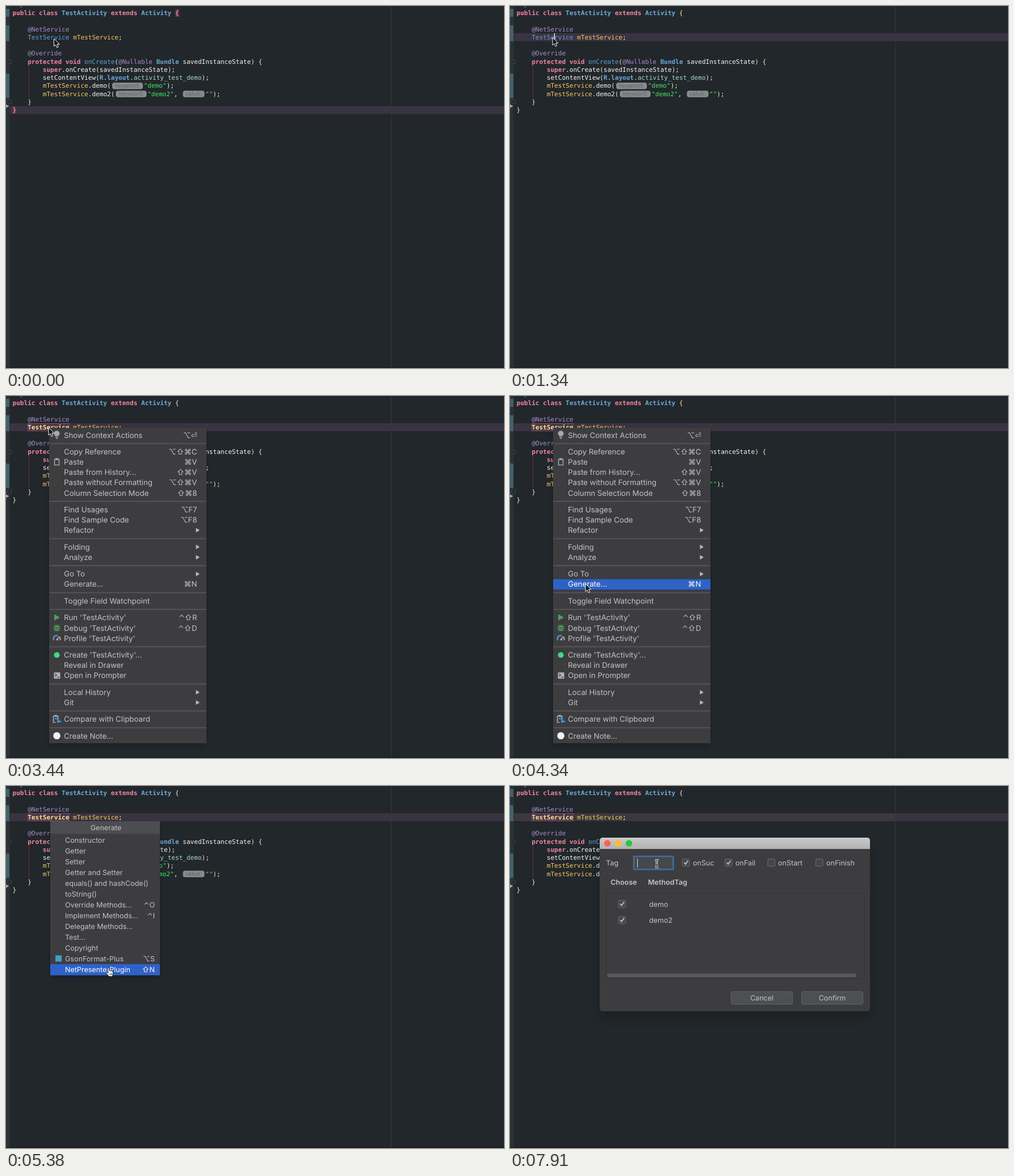
Animation, 877 px wide and 638 px high, one loop 8 s. Source, as an HTML page:

```html
<!DOCTYPE html>
<html lang="en">
<head>
<meta charset="utf-8">
<title>Code editor</title>
<style>
html, body { margin: 0; width: 100%; height: 100%; overflow: hidden; background: #21272b; }
svg { display: block; width: 877px; height: 638px; }
text { white-space: pre; text-rendering: geometricPrecision; }
.code { font: 11.07px "DejaVu Sans Mono", monospace; fill: #f4f5f0; }
.ui { font: 12.55px Inter, sans-serif; fill: #c3c4c6; }
#menu .ui { font-size: 13.25px; }
.hint { font: 10.5px "Open Sans", sans-serif; fill: #5d6062; }
.k { fill: #f283a4; font-weight: bold; }
.c { fill: #6fa9d6; font-weight: bold; }
.f { fill: #649fcd; }
.a { fill: #a88bcd; }
.y { fill: #fbc65c; }
.s { fill: #42e45f; }
.r { fill: #a9d6cb; }
.b { fill: #f2ebc6; }
.g { fill: #8b9296; }
.m { fill: #ffe09a; font-weight: bold; }
.on { fill: #fff; }
.bold { font-weight: 600; }
.mid { text-anchor: middle; }
.end { text-anchor: end; }
.sym { font-family: "DejaVu Sans", sans-serif; }
</style>
</head>
<body>
<svg id="stage" viewBox="0 0 877 638"></svg>
<script>
const LOOP = 8000;
const CH = 6.664, LINE = 14.26, LEFT = 11.5;
const stage = document.getElementById('stage');

const rect = (x, y, w, h, fill, more = '') =>
  `<rect x="${x}" y="${y}" width="${w}" height="${h}" fill="${fill}" ${more}/>`;
const path = (d, fill, more = '') => `<path d="${d}" fill="${fill}" ${more}/>`;
const dot = (x, y, r, fill) => `<circle cx="${x}" cy="${y}" r="${r}" fill="${fill}"/>`;
const group = (id, body, more = '') => `<g id="${id}" ${more}>${body}</g>`;
const label = (x, y, s, cls = '') => `<text class="ui ${cls}" x="${x}" y="${y + 4.6}">${s}</text>`;

// Code: "class:text" tokens, parts of a line separated by "|".
const codeAt = (x, row, src) => {
  const spans = src.split('|').map(p => `<tspan class="${p[0]}">${p.slice(2)}</tspan>`).join('');
  return `<text class="code" x="${x}" y="${16 + row * LINE}">${spans}</text>`;
};
const code = (row, col, src) => codeAt(LEFT + col * CH, row, src);
const hint = (x, row, w, s) => {
  const y = 6.6 + row * LINE;
  return rect(x, y, w, 11.6, '#898c8e', 'rx="4"') +
    `<text class="hint mid" x="${x + w / 2}" y="${y + 9.2}">${s}</text>`;
};

function editor() {
  const marks = [[5, 14], [34, 28], [119, 43]].map(([y, h]) => rect(0, y, 6, h, '#41616b')).join('');
  const folds = [98, 169].map(y => rect(3.5, y - 3, 6, 6, '#22282b', 'stroke="#3a4145"')).join('');
  return rect(0, 0, 877, 638, '#21272b') + rect(0, 0, 6.5, 638, '#2b3236') + marks +
    rect(6.5, 0, 1, 638, '#272d31') +
    rect(6.5, 176.5, 870.5, 14, '#3a3341', 'id="rowEnd"') +
    rect(6.5, 48, 870.5, 14, '#3a3341', 'id="rowField"') +
    rect(6.5, 48, 671.5, 14, '#3b393e', 'id="rowDim"') +
    rect(678, 0, 1, 638, '#32383b') + rect(0, 636.5, 877, 1.5, '#1a1f22') +
    folds + path('M0 173.5 5.5 176.5 0 179.5Z', '#a9abac') +
    rect(40, 105, 1, 57, '#6e3048') +
    code(-1, 0, 'g: */') +
    code(0, 0, 'k:public class |c:TestActivity |k:extends |c:Activity ') +
    code(2, 4, 'a:@NetService') +
    code(3, 16, 'y:mTestService|w:;') +
    code(5, 4, 'a:@Override') +
    code(6, 4, 'k:protected void |f:onCreate|b:(|a:@Nullable |c:Bundle |w:savedInstanceState|b:) {') +
    code(7, 8, 'k:super|w:.onCreate|b:(|w:savedInstanceState|b:)|w:;') +
    code(8, 8, 'w:setContentView|b:(|c:R|w:.|c:layout|w:.|r:activity_test_demo|b:)|w:;') +
    code(9, 8, 'y:mTestService|w:.demo|b:(') + hint(187, 9, 54, 'keyword:') +
    codeAt(242.7, 9, 's:"demo"|b:)|w:;') +
    code(10, 8, 'y:mTestService|w:.demo2|b:(') + hint(193.5, 10, 54, 'keyword:') +
    codeAt(249.2, 10, 's:"demo2"|w:, ') + hint(311.5, 10, 38, 'value:') +
    codeAt(351, 10, 's:""|b:)|w:;') +
    code(11, 4, 'b:}') +
    group('bracePlain', code(0, 43, 'b:{') + code(12, 0, 'b:}')) +
    group('braceMatch', rect(298, 5.5, 7, 13.5, '#4e3a46') + rect(11.5, 177, 7, 13, '#4e3a46') +
      code(0, 43, 'k:{') + code(12, 0, 'k:}')) +
    group('typePlain', code(3, 4, 'f:TestService')) +
    group('typeMarked', rect(38.5, 48.5, 72.5, 13, '#4a3646', 'stroke="#865465"') + code(3, 4, 'm:TestService')) +
    rect(77.7, 48, 1.4, 12, '#f2f2f2', 'id="caret"') +
    group('hintBulb', bulb(26.5, 40, '#f2bd44'));
}

function bulb(x, y, fill) {
  return `<g transform="translate(${x} ${y})">` +
    path('M-2.6 2.5C-2.8 1-5 .2-5-2.5A5 4.8 0 0 1 5-2.5C5 .2 2.8 1 2.6 2.5Z', fill) +
    path('M-2.5 3.5h5v1.2h-5ZM-2 5.5h4l-1 1.5h-2Z', '#a5a7a9') + '</g>';
}

const icons = {
  bulb: y => bulb(89.5, y - .5, '#a5a7a9'),
  paste: y => path(`M85.5 ${y - 5}h8v10h-8Z`, 'none', 'stroke="#b0b2b4" stroke-width="1.4"') +
    rect(87, y - 7, 5, 3, '#b0b2b4'),
  run: y => path(`M85 ${y - 6} 95 ${y - .5} 85 ${y + 5}Z`, '#4d9f55'),
  bug: y => `<ellipse cx="89.5" cy="${y + .5}" rx="3.6" ry="5" fill="#4d9f55"/>` +
    path(`M84 ${y - 3}h11M83.5 ${y + .5}h12M84 ${y + 4}h11M87 ${y - 6}l1.5 2M92 ${y - 6}l-1.5 2`, 'none',
      'stroke="#4d9f55" stroke-width="1.5"') +
    path(`M87 ${y - .7}h5M87 ${y + 2}h5`, 'none', 'stroke="#3c3d40"'),
  gauge: y => path(`M84.5 ${y + 3.5}A5.4 5.4 0 0 1 91 ${y - 4.5}`, 'none', 'stroke="#4a9bd3" stroke-width="2.4"') +
    path(`M93 ${y - 3}A5.4 5.4 0 0 1 95 ${y + 3.5}`, 'none', 'stroke="#b0b2b4" stroke-width="2"') +
    path(`M88 ${y + 3} 93.5 ${y - 4} 91 ${y + 4}Z`, '#c0c2c4'),
  green: y => dot(89.5, y, 5, '#3ddc84'),
  shell: y => rect(84.5, y - 5.5, 11, 11, '#aeb0b2') +
    path(`M86.5 ${y - 3}l2.5 2.2-2.5 2.2M90 ${y + 3}h4`, 'none', 'stroke="#3c3d40" stroke-width="1.3"'),
  compare: y => path(`M83.5 ${y + 5.5}v-11h8v4M83.5 ${y + 5.5}h4`, 'none', 'stroke="#aeb0b2" stroke-width="1.6"') +
    rect(85, y - 7.5, 5, 3, '#aeb0b2') +
    path(`M86 ${y - 2}h4v-2.5l4 3.5-4 3.5v-2.5h-4ZM97 ${y + 2.5}h-4v-2l-4 3.3 4 3.3v-2h4Z`, '#3d9ad6'),
  white: y => dot(89.5, y - .5, 6.3, '#f0f1f2')
};

// Label, shortcut (">" opens a submenu), icon; null is a separator.
const MENU = [
  ['Show Context Actions', '⌥<tspan class="sym">⏎</tspan>', 'bulb'], null,
  ['Copy Reference', '⌥⇧⌘C'], ['Paste', '⌘V', 'paste'], ['Paste from History...', '⇧⌘V'],
  ['Paste without Formatting', '⌥⇧⌘V'], ['Column Selection Mode', '⇧⌘8'], null,
  ['Find Usages', '⌥F7'], ['Find Sample Code', '⌥F8'], ['Refactor', '>'], null,
  ['Folding', '>'], ['Analyze', '>'], null,
  ['Go To', '>'], ['Generate...', '⌘N'], null,
  ['Toggle Field Watchpoint'], null,
  ["Run 'TestActivity'", '⌃⇧R', 'run'], ["Debug 'TestActivity'", '⌃⇧D', 'bug'],
  ["Profile 'TestActivity'", '', 'gauge'], null,
  ["Create 'TestActivity'...", '', 'green'], ['Reveal in Drawer'], ['Open in Prompter', '', 'shell'], null,
  ['Local History', '>'], ['Git', '>'], null,
  ['Compare with Clipboard', '', 'compare'], null,
  ['Create Note...', '', 'white']
];
const GENERATE = [
  ['Constructor'], ['Getter'], ['Setter'], ['Getter and Setter'], ['equals() and hashCode()'], ['toString()'],
  ['Override Methods...', '⌃O'], ['Implement Methods...', '⌃I'], ['Delegate Methods...'], ['Test...'],
  ['Copyright'], ['GsonFormat-Plus', '⌥S'], ['NetPresenterPlugin', '⇧N']
];
const menuRows = [], ROW = 18.1, POP_ROW = 19.05;

function menu() {
  let y = 69, out = '';
  for (const item of MENU) {
    if (!item) {
      out += rect(76, y - 4.3, 277, 2, '#525457');
      y += 11.4;
      continue;
    }
    const [name, key = '', icon] = item;
    menuRows.push(y);
    out += `<g class="row">${label(102, y, name)}`;
    out += key === '>' ? path(`M334.5 ${y - 4}l6.5 4-6.5 4Z`, '#b9babc') : label(336.5, y, key, 'end');
    out += '</g>' + (icon ? icons[icon](y) : '');
    y += ROW;
  }
  return rect(76, 56, 277, 556, '#3c3d40', 'filter="url(#soft)"') +
    rect(76, 0, 277, 18, '#2d62cb', 'id="menuBar"') + out;
}

function popup() {
  const rows = GENERATE.map(([name, key = ''], i) => {
    const y = 95 + i * POP_ROW;
    return `<g class="pop">${label(104, y, name)}${label(262, y, key, 'end')}</g>`;
  }).join('');
  return rect(78, 62, 193, 271.5, '#3c3d40', 'filter="url(#soft)"') + rect(78, 62, 193, 22.5, '#4b4d50') +
    label(176, 73, 'Generate', 'mid') + rect(78, 0, 193, 19.5, '#2d62cb', 'id="popBar"') +
    rows + rect(87, 298.5, 11, 11, '#419fc0');
}

function check(x, y, on, id = '') {
  return rect(x + .5, y - 6.5, 12.5, 12.5, '#43474a', 'rx="1.5" stroke="#6d7072"') +
    (id ? rect(x - .5, y - 7.5, 14.5, 14.5, 'none', `id="${id}" rx="3" stroke="#4a7fb8" stroke-width="2"`) : '') +
    (on ? path(`M${x + 3.5} ${y - .5}l2.6 3 4.4-6.4`, 'none', 'stroke="#c8c9ca" stroke-width="1.7"') : '');
}

function dialog() {
  const button = (x, s) => rect(x + .5, 362.5, 108, 22, '#4c5053', 'rx="3" stroke="#626567"') +
    label(x + 54.5, 373.5, s, 'mid');
  const lights = ['#ff5f57', '#febc2e', '#28c840'].map((c, i) => dot(171.5 + i * 19, 101, 5.8, c)).join('');
  const options = [['onSuc', 303, 322], ['onFail', 378, 397], ['onStart', 453.5, 472], ['onFinish', 538, 557]];
  return rect(158, 91, 476, 306, '#3c3d40', 'rx="5" filter="url(#deep)"') +
    path('M158 111V96a5 5 0 0 1 5-5H629a5 5 0 0 1 5 5V111Z', 'url(#bar)') + lights +
    label(169, 135.5, 'Tag') + rect(218.5, 124.5, 68.5, 22, '#45494c', 'stroke="#65686a"') +
    group('fieldFocus', rect(218, 124, 69.5, 23, '#45494c', 'rx="1" stroke="#3f6d9e" stroke-width="2.6"') +
      rect(224, 127.5, 1, 16, '#d5d6d7')) +
    options.map(([s, x, tx], i) => check(x, 135.3, i < 2, i ? '' : 'checkFocus') + label(tx, 135.5, s)).join('') +
    label(177, 169, 'Choose', 'bold') + label(243, 169, 'MethodTag', 'bold') +
    rect(168.5, 188.5, 455.5, 150.5, 'none', 'stroke="#323437"') +
    check(190.5, 208, true) + label(245, 208, 'demo') +
    check(190.5, 236.5, true) + label(245, 236.5, 'demo2') +
    rect(171, 330.5, 439, 6.5, '#626466', 'id="thumb" rx="3"') +
    button(389, 'Cancel') + button(513, 'Confirm');
}

const pointers = {
  arrow: path('M0 0V13.6L3 10.8 5.2 15.6 7.6 14.5 5.5 9.9H9.6Z', '#0c0d0e', 'stroke="#fff" stroke-width="1"'),
  hand: path('M-1.2.8C-1.2-.5 1.3-.5 1.4.8L1.8 5.4C2.6 4.6 4 4.8 4.2 5.7 5 5 6.2 5.3 6.4 6.3 7.2 5.9 8.2 6.5 8.2 7.4' +
    'V10.5C8.2 12.5 7 13 6.8 15.3H.6C.3 13.3-3.5 10.5-4 8.5-4.2 7.5-2.7 7-1.8 8L-.6 9.3Z', '#fff',
    'stroke="#111" stroke-width="1"') +
    path('M2.3 9v4M4.2 9v4M6 9v4', 'none', 'stroke="#111" stroke-width=".7"'),
  beam: ['stroke="#fff" stroke-width="3.2"', 'stroke="#111" stroke-width="1.1"'].map(s =>
    path('M-3-6.5Q0-6.5 0-4.5Q0-6.5 3-6.5M0-4.5V4.5M-3 6.5Q0 6.5 0 4.5Q0 6.5 3 6.5M-1.8 2h3.6', 'none', s)).join('')
};

// Pointer stops: time, x, y, shape.
const STOPS = [
  [0, 84.5, 57.5, 'arrow'], [450, 95, 60], [600, 100, 61],
  [900, 92, 59], [1050, 79, 56], [1200, 75, 55.5],
  [3890, 92, 118], [4040, 117, 232], [4190, 131, 312], [4340, 133, 331],
  [5090, 147, 328, 'hand'], [5240, 170, 323], [5380, 180.5, 320.5],
  [5970, 180, 318.5, 'arrow'], [6570, 190, 284], [6720, 213, 206], [6870, 236, 121],
  [7020, 250, 104], [7170, 256, 128, 'beam'], [7320, 258.5, 137]
];

stage.innerHTML = `<defs>
  <linearGradient id="bar" x2="0" y2="1"><stop stop-color="#cbcbcb"/><stop offset="1" stop-color="#b1b1b1"/></linearGradient>
  <filter id="soft"><feDropShadow dx="0" dy="4" stdDeviation="5" flood-opacity=".22"/></filter>
  <filter id="deep" x="-10%" y="-10%" width="120%" height="140%"><feDropShadow dx="0" dy="13" stdDeviation="12" flood-opacity=".22"/></filter>
</defs>` + editor() + group('menu', menu()) + group('popup', popup()) + group('dialog', dialog()) +
  group('pointer', Object.entries(pointers).map(([k, v]) => group(k, v)).join(''));

const el = id => document.getElementById(id);
const show = (id, on) => el(id).setAttribute('display', on ? 'inline' : 'none');
const within = (t, a, b = LOOP) => t >= a && t < b;

function select(rows, bar, index, y, h) {
  document.querySelectorAll(rows).forEach((row, i) =>
    row.querySelectorAll('text').forEach(s => s.classList.toggle('on', i === index)));
  show(bar, index >= 0);
  el(bar).setAttribute('y', Math.round(y - h / 2));
}

function render(t) {
  let x, y, shape;
  for (const [at, px, py, kind] of STOPS) {
    if (at > t) break;
    [x, y, shape] = [px, py, kind || shape];
  }
  el('pointer').setAttribute('transform', `translate(${x} ${y})`);
  Object.keys(pointers).forEach(k => show(k, k === shape));

  const clicked = t >= 1200, open = t >= 5970, focused = t >= 7470;
  show('rowEnd', !clicked);
  show('rowField', clicked);
  show('rowDim', open);
  show('braceMatch', !clicked);
  show('bracePlain', clicked);
  show('typePlain', t < 1790);
  show('typeMarked', t >= 1790);
  show('caret', within(t, 1200, 1790) || within(t, 2390, 2990));
  show('hintBulb', within(t, 2390, 3440));

  show('menu', within(t, 3440, 4790));
  const row = menuRows.findIndex(c => Math.abs(c - y) <= ROW / 2);
  select('.row', 'menuBar', t >= 3890 ? row : -1, menuRows[row] || 0, ROW);

  show('popup', within(t, 4940, 5970));
  const pick = t < 5090 ? 0 : GENERATE.length - 1;
  select('.pop', 'popBar', pick, 95 + pick * POP_ROW, POP_ROW);

  show('dialog', open);
  show('checkFocus', !focused);
  show('fieldFocus', focused);
  el('thumb').setAttribute('fill', t < 7910 ? '#626466' : '#56585a');
}

const start = performance.now();
function tick() {
  render((performance.now() - start) % LOOP);
  requestAnimationFrame(tick);
}
render(0);
tick();
</script>
</body>
</html>
```
